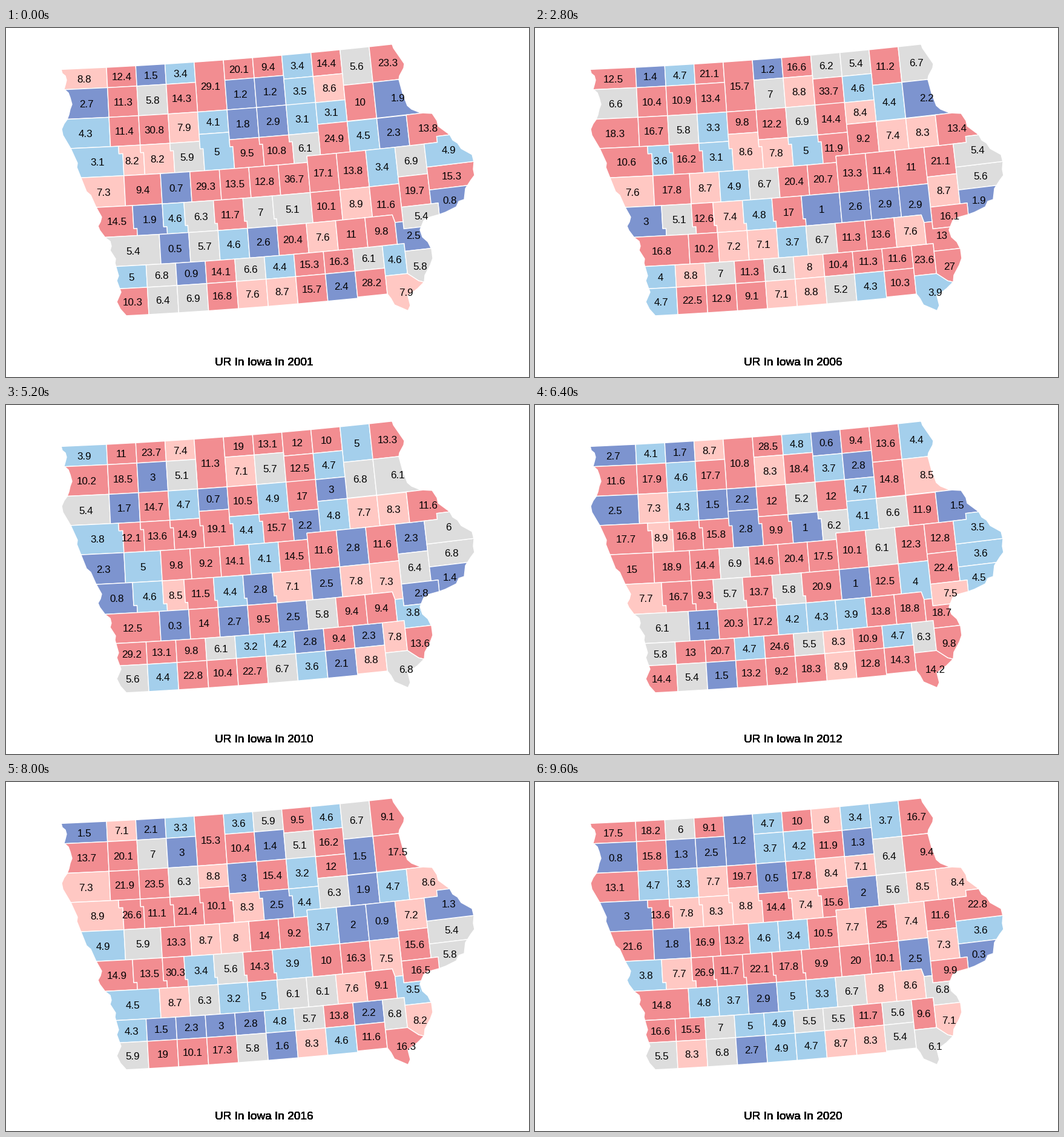
These frames come from a looping animation (864 px wide and 576 px high, 10 s). A matplotlib script:

```python
import numpy as np
import matplotlib.pyplot as plt
from matplotlib.animation import FuncAnimation
from matplotlib.patches import Polygon

WIDTH, HEIGHT, DPI = 864, 576, 100
PX = 72 / DPI
STEP = 200
LIMITS = [3, 5, 7, 9]
COLORS = ["#7d94cf", "#a4cfec", "#dddddd", "#ffc8c3", "#f28d91"]

# Conic projection: a column is an angle, a depth is a distance south of the top border.
RADIUS, ANGLE, COLUMN = 7800, 0.0505, 0.0062
POLE = np.array([166 - RADIUS * np.sin(ANGLE), 65 - RADIUS * np.cos(ANGLE)])

plt.rcParams["font.family"] = "Liberation Sans"
fig = plt.figure(figsize=(WIDTH / DPI, HEIGHT / DPI), dpi=DPI, facecolor="white")
ax = fig.add_axes([0, 0, 1, 1])
ax.set_xlim(0, WIDTH)
ax.set_ylim(HEIGHT, 0)
ax.axis("off")

shapes, labels = [], []


def project(column, depth):
    angle, radius = ANGLE + COLUMN * column, RADIUS + depth
    return POLE[0] + radius * np.sin(angle), POLE[1] + radius * np.cos(angle)


def unproject(x, y):
    dx, dy = x - POLE[0], y - POLE[1]
    return (np.arctan2(dx, dy) - ANGLE) / COLUMN, np.hypot(dx, dy) - RADIUS


def meridian(column, shift=0, bend=0):
    """Straight edge, or one that steps east by shift at the depth bend."""
    def edge(top, bottom):
        middle = [(column, bend), (column + shift, bend)] if shift else []
        return [(column, top), *middle, (column + shift, bottom)]
    return edge


def river(*points):
    """Winding edge through pixel points listed from north to south."""
    columns, depths = unproject(*np.array(points, float).T)

    def edge(top, bottom):
        inner = depths[(depths > top) & (depths < bottom)]
        return [(np.interp(d, depths, columns), d) for d in (top, *inner, bottom)]
    return edge


def county(*outline):
    points = np.array(outline)
    shape = Polygon(np.column_stack(project(*points.T)), closed=True, ec="white",
                    lw=1.4 * PX, joinstyle="round")
    x, y = project(*(points.min(axis=0) + points.max(axis=0)) / 2)
    shapes.append(ax.add_patch(shape))
    labels.append(ax.text(x, y + 6, "", size=17.07 * PX, ha="center", va="baseline"))


def row(top, bottom, *edges):
    for left, right in zip(edges, edges[1:]):
        county(*left(top, bottom), *right(top, bottom)[::-1])


def meridians(first, last, start=0, step=1, **bend):
    return [meridian(start + step * k, **bend) for k in range(first, last + 1)]


west = river(
    (91, 68), (93, 75), (98, 79), (100, 86), (98, 94), (96, 101), (103, 107), (106, 115),
    (109, 126), (106, 134), (104, 143), (101, 151), (96, 158), (92, 167), (94, 177),
    (107, 199), (118, 223), (117, 230), (127, 255), (133, 270), (140, 276), (149, 296),
    (158, 312), (156, 320), (152, 327), (155, 334), (164, 346), (172, 352), (174, 360),
    (172, 367), (181, 381), (180, 388), (186, 409), (183, 417), (190, 436), (183, 452),
    (189, 464), (198, 474))
east = river(
    (638, 27), (640, 33), (658, 59), (657, 66), (650, 79), (649, 85), (655, 107),
    (663, 128), (670, 134), (685, 140), (704, 141), (712, 153), (714, 162), (733, 176),
    (738, 185), (746, 190), (752, 199), (770, 209), (773, 221), (772, 233), (774, 243),
    (768, 251), (759, 265), (757, 283), (748, 286), (744, 295), (726, 304), (715, 308),
    (697, 313), (690, 318), (684, 333), (688, 345), (697, 353), (703, 365), (705, 380),
    (701, 391), (692, 408), (691, 419), (680, 430), (664, 442), (668, 458), (664, 467))

# North: three even rows in the west, taller and staggered counties to the east.
row(0, 33.5, west, *meridians(0, 3))
row(0, 82.5, *meridians(3, 4))
row(0, 33.5, *meridians(4, 6))
row(0, 39.5, *meridians(6, 8))
row(0, 59, *meridians(8, 9), east)
row(33.5, 82.5, west, *meridians(0, 3))
row(33.5, 82.5, *meridians(4, 6))
row(39.5, 83, *meridians(6, 8))
row(59, 118.5, *meridians(8, 9), east)
row(82.5, 131, west, *meridians(0, 3))
row(82.5, 119.5, *meridians(3, 4))
row(82.5, 132, *meridians(4, 7))
row(83, 119, *meridians(7, 8))
row(119, 169.5, *meridians(7, 10))

# Fourth row, with stepped borders between the counties.
stairs = meridians(1, 6, shift=0.1, bend=143.5)
row(131, 180, west, meridian(0.27, 0.13, 143.5), *stairs[:3])
row(119.5, 180, *stairs[2:4])
row(132, 180, *stairs[3:])
county(*stairs[5](132, 180), (6.545, 180), (6.545, 169.5), (7, 169.5), (7, 132))

# Middle: the eastern half of the fifth row starts further north.
middle = meridians(0, 9, 1.62, 0.985)
row(180, 230, west, meridian(0.4), *middle[:6])
row(169.5, 230, *middle[5:9])
row(169.5, 219, *middle[8:])
row(219, 269, *middle[8:])
row(208, 246, middle[9], east)
row(230, 280, west, meridian(0.63, 0.11, 268), meridian(1.62, 0.11, 268),
    *meridians(0, 3, 2.34, 0.98, shift=0.08, bend=268), *middle[5:8])

# South: two grids of slightly narrower counties.
south = meridians(0, 7, 1.46, 0.972)
row(280, 329, west, *south)
bottom = meridians(0, 8, 0.97, 0.971)
row(329, 366, west, *bottom)
row(366, 411, west, *bottom[:8])
row(366, 409, *bottom[7:])
row(329, 379, bottom[8], meridian(9.46))

# Irregular counties along the eastern river.
county((10, 169.5), (10, 118.5), *east(118.5, 159.5), (10.93, 159.5), (10.93, 169.5))
county((10.485, 208), (10.485, 169.5), (10.93, 169.5), (10.93, 159.5), *east(159.5, 208))
county((10.485, 269), (10.485, 246), *east(246, 288), (10.72, 269))
county((9.5, 305), (9.5, 269), (10.72, 269), *east(288, 305))
county((8.515, 280), (8.515, 230), (9.5, 230), (9.5, 293), (9.236, 293), (9.17, 280))
county((8.264, 329), (8.264, 280), (9.17, 280), (9.236, 293), (9.236, 329))
county((9.236, 329), (9.236, 293), (9.5, 293), (9.5, 305), *east(305, 342),
       (9.46, 342), (9.46, 329))
county((9.46, 379), (9.46, 342), *east(342, 396), (9.8, 393))
county((8.74, 409), (8.74, 379), (9.46, 379), (9.8, 393), *east(396, 440),
       (9.21, 436), (8.93, 428), (8.84, 417))

# Stacked copies harden the antialiased edges of the title.
titles = [ax.text(426.5, 557, "", size=18.97 * PX, ha="center", va="baseline")
          for _ in range(8)]


def year_at(ms):
    """Years last 400 ms, except 2002 to 2011 with 600 ms each."""
    if ms < 400:
        return 2001
    if ms < 6400:
        return 2002 + (ms - 400) // 600
    return 2012 + (ms - 6400) // 400


def update(frame):
    year = year_at(frame * STEP)
    rates = np.random.default_rng(year).gamma(2, 4.5, len(shapes)).round(1).clip(0.3)
    for shape, label, rate in zip(shapes, labels, rates):
        shape.set_facecolor(COLORS[np.searchsorted(LIMITS, rate)])
        label.set_text(f"{rate:.3g}")
    for title in titles:
        title.set_text(f"UR In Iowa In {year}")
    return shapes + labels + titles


anim = FuncAnimation(fig, update, frames=50, interval=STEP, repeat=True, repeat_delay=0)
plt.show()
```
